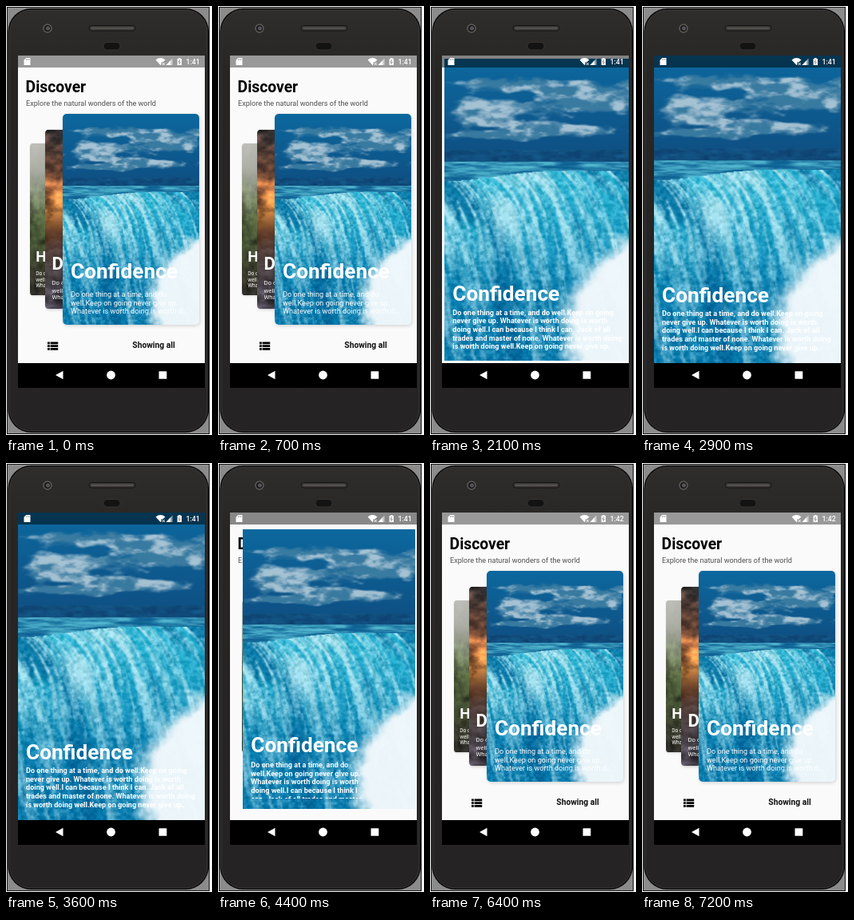
Write an HTML page with a canvas that moves like this. It is 258x537 px and loops after 7300 ms.

```html
<!DOCTYPE html>
<html lang="en">
<head>
<meta charset="utf-8">
<title>Discover</title>
<style>
@property --open { syntax: '<number>'; inherits: true; initial-value: 0; }
@property --drag { syntax: '<number>'; inherits: true; initial-value: 0; }

html, body { margin: 0; width: 100%; height: 100%; overflow: hidden; background: #fff; }
.stage { position: absolute; left: 0; top: 0; width: 258px; height: 537px; overflow: hidden; }
.stage > svg { position: absolute; left: 0; top: 0; }

.screen {
  position: absolute; left: 15px; top: 62px; width: 234px; height: 416px;
  overflow: hidden; background: #fafafa; color: #000;
  font-family: Roboto, sans-serif;
  animation: open 7300ms infinite, drag 7300ms infinite;
}
.screen > *, .card > * { position: absolute; }
.label { white-space: pre; line-height: 1.172; }
.heading { left: 9.6px; top: 29px; font-size: 19.3px; font-weight: 700; }
.intro { left: 10px; top: 54.8px; font-size: 9.12px; color: #505050; }
.filter { left: 143.3px; top: 357.3px; font-size: 10.3px; font-weight: 700; color: #111; }

.card {
  left: calc(56px + 170px * var(--drag) - 56px * var(--open));
  top: calc(73px - 73px * var(--open));
  width: calc(171px + 63px * var(--open));
  height: calc(264px + 121px * var(--open));
  overflow: hidden; border-radius: 5px; color: #fff;
  box-shadow: 1px 1.5px 4px rgba(0, 0, 0, .16);
  transform-origin: left center;
}
.front { animation: flatten 7300ms step-end infinite; }
.side { --open: 0; }
.second { left: calc(34px + 22px * var(--drag)); transform: scale(calc(.85 + .15 * var(--drag))); }
.third { left: calc(15px + 19px * var(--drag)); transform: scale(calc(.72 + .13 * var(--drag))); }
.card canvas { left: 0; top: 0; width: 100%; height: 100%; object-fit: cover; }
.title {
  left: 10px; top: calc(181.7px + 103px * var(--open));
  font-size: 26.2px; font-weight: 700; line-height: 30.7px; white-space: pre;
}
.text {
  left: 10px; top: calc(221px + 97px * var(--open)); height: calc(32px + 21.4px * var(--open));
  overflow: hidden; white-space: pre; font-size: 9.12px; line-height: 10.67px;
}
.calm { animation: calm 7300ms step-end infinite; }
.wide, .tight { font-weight: 700; opacity: 0; animation: wide 7300ms step-end infinite; }
.tight { animation-name: tight; }

.shade { left: 0; top: 0; width: 234px; height: 15px; background: rgba(0, 0, 0, calc(.39 + .1 * var(--open))); }
.nav { left: 0; top: 385px; width: 234px; height: 31px; background: #000; }
.icons { left: 0; top: 0; }
.clock { left: 210.5px; top: 2.7px; font-size: 8.8px; font-weight: 500; color: #fff; }
.before { animation: before 7300ms step-end infinite; }
.after { opacity: 0; animation: after 7300ms step-end infinite; }
.ripple { opacity: 0; animation: ripple 7300ms infinite; }

@keyframes open {
  0%, 24.52% { --open: 0; animation-timing-function: cubic-bezier(.4, 0, .2, 1); }
  30.55%, 58.75% { --open: 1; animation-timing-function: cubic-bezier(.4, 0, .2, 1); }
  64.4%, 100% { --open: 0; }
}
@keyframes drag {
  0%, 70.5% { --drag: 0; animation-timing-function: ease-out; }
  73.9%, 75.3% { --drag: .1; animation-timing-function: ease-out; }
  79.5%, 100% { --drag: 0; }
}
@keyframes flatten {
  20.55% { border-radius: 0; box-shadow: none; }
  64.4% { border-radius: 5px; box-shadow: 1px 1.5px 4px rgba(0, 0, 0, .16); }
}
@keyframes calm { 0% { opacity: 1; } 20.55% { opacity: 0; } 64.4%, 100% { opacity: 1; } }
@keyframes wide { 0% { opacity: 0; } 20.55% { opacity: 1; } 58.75%, 100% { opacity: 0; } }
@keyframes tight { 0% { opacity: 0; } 58.75% { opacity: 1; } 64.4%, 100% { opacity: 0; } }
@keyframes before { 0% { opacity: 1; } 84.93%, 100% { opacity: 0; } }
@keyframes after { 0% { opacity: 0; } 84.93%, 100% { opacity: 1; } }
@keyframes ripple { 0%, 53.3% { opacity: 0; } 54.5%, 56% { opacity: .2; } 58.9%, 100% { opacity: 0; } }
</style>
</head>
<body>
<div class="stage">
  <svg width="258" height="537">
    <defs>
      <linearGradient id="body" x2="0" y2="1">
        <stop offset="0" stop-color="#2f2d2c"/>
        <stop offset=".15" stop-color="#282625"/>
        <stop offset="1" stop-color="#252323"/>
      </linearGradient>
    </defs>
    <rect x="1.5" y="1.5" width="253" height="534" fill="#8b8b8b" stroke="#111"/>
    <rect x="2.5" y="3" width="251.5" height="531" rx="29" fill="#0c0b0b"/>
    <rect x="4.5" y="5" width="247.5" height="527" rx="27" fill="url(#body)" stroke="#454241" stroke-width=".8"/>
    <circle cx="52" cy="28" r="5" fill="#1b1a1a" stroke="#5f5c5a" stroke-width="1.5"/>
    <circle cx="52.5" cy="28" r="2" fill="#4a4b50" stroke="#77757a" stroke-width=".8"/>
    <rect x="104" y="24.5" width="58" height="6.5" rx="3.2" fill="#3d3a38" stroke="#121111"/>
    <path d="M107 27.7h52" stroke="#5d5a58" stroke-width="1.6"/>
    <rect x="122" y="45.5" width="21" height="9.5" rx="4.7" fill="#141313" stroke="#3b3836" stroke-width=".8"/>
  </svg>

  <div class="screen">
    <div class="label heading">Discover</div>
    <div class="label intro">Explore the natural wonders of the world</div>
    <div class="label filter">Showing all</div>
    <svg style="left:37px;top:358px" width="14" height="12">
      <path d="M0 1.8h2.8M3.6 1.8h9.6M0 5.6h2.8M3.6 5.6h9.6M0 9.4h2.8M3.6 9.4h9.6" stroke="#000" stroke-width="2.8"/>
    </svg>

    <div class="card side third">
      <canvas id="forest"></canvas>
      <div class="title">Happiness</div>
      <div class="text">Do one thing at a time, and do
well.Keep on going never give up.
Whatever is worth doing is worth d…</div>
    </div>
    <div class="card side second">
      <canvas id="sunset"></canvas>
      <div class="title">Dreams</div>
      <div class="text">Do one thing at a time, and do
well.Keep on going never give up.
Whatever is worth doing is worth d…</div>
    </div>
    <div class="card front">
      <canvas id="waterfall"></canvas>
      <div class="title">Confidence</div>
      <div class="text calm">Do one thing at a time, and do
well.Keep on going never give up.
Whatever is worth doing is worth d…</div>
      <div class="text wide">Do one thing at a time, and do well.Keep on going
never give up. Whatever is worth doing is worth
doing well.I can because I think I can. Jack of all
trades and master of none. Whatever is worth doing
is worth doing well.Keep on going never give up.</div>
      <div class="text tight">Do one thing at a time, and do
well.Keep on going never give up.
Whatever is worth doing is worth
doing well.I can because I think I
can. Jack of all trades and master</div>
    </div>

    <div class="shade"></div>
    <div class="nav"></div>
    <svg class="icons" width="234" height="416" viewBox="15 62 234 416" fill="#fff">
      <path d="M25.2 65H30.5V74H22.5V67.7Z"/>
      <path d="M25.6 66v2M27.3 66v2M29 66v2" stroke="#888" stroke-width=".7"/>
      <path d="M187.5 67.5Q193.5 62.7 199.5 67.5L196.5 70.2H194.5V73.2L193.5 74Z"/>
      <path d="M195.8 71l3 3m0-3l-3 3" stroke="#fff"/>
      <path d="M208.5 65.5V74H200.5Z" opacity=".55"/>
      <path d="M206 68.2V74H200.5Z"/>
      <path d="M216 65h2.6v1h1.4v8h-5.4v-8h1.4Z"/>
      <path d="M217.9 67.2l-1.9 3h2.4l-1.7 2.8" fill="none" stroke="#777" stroke-width=".8"/>
      <ellipse class="ripple" cx="66" cy="462" rx="23" ry="15.5"/>
      <path d="M62 462L71.500 456.700V467.300Z"/>
      <circle cx="131.500" cy="462" r="5.400"/>
      <rect x="191.500" y="457.200" width="9.800" height="9.600" rx=".6"/>
    </svg>
    <div class="label clock before">1:41</div>
    <div class="label clock after">1:42</div>
  </div>
</div>

<script>
const mix = (a, b, t) => a.map((c, i) => c + (b[i] - c) * t);
const clamp = t => Math.min(1, Math.max(0, t));
const smooth = (lo, hi, x) => {
  const t = clamp((x - lo) / (hi - lo));
  return t * t * (3 - 2 * t);
};
const hash = (x, y) => {
  const s = Math.sin(x * 127.1 + y * 311.7) * 43758.5453;
  return s - Math.floor(s);
};
function noise(x, y) {
  const i = Math.floor(x), j = Math.floor(y);
  const a = smooth(0, 1, x - i), b = smooth(0, 1, y - j);
  const top = hash(i, j) * (1 - a) + hash(i + 1, j) * a;
  const low = hash(i, j + 1) * (1 - a) + hash(i + 1, j + 1) * a;
  return top * (1 - b) + low * b;
}
function fbm(x, y) {
  let sum = 0;
  for (let k = 0, gain = .533; k < 4; k++, gain /= 2) sum += gain * noise(x * 2 ** k + k * 9, y * 2 ** k);
  return sum;
}
function ramp(stops, t) {
  const at = clamp(t) * (stops.length - 1);
  const i = Math.min(stops.length - 2, Math.floor(at));
  return mix(stops[i], stops[i + 1], at - i);
}
const distance = (u, v, [x, y, rx, ry]) => Math.hypot((u - x) / rx, (v - y) / ry);

// Cloud banks and spray: centre x, centre y, radius x, radius y
const banks = [[.85, .13, .3, .05], [.25, .185, .34, .042], [.4, .085, .24, .028],
               [.72, .235, .4, .022], [.18, .25, .34, .016]];
const spray = [1.1, .88, .47, .3];

function sky(u, v) {
  const n = fbm(u * 7, v * 26 + 4) - .5;
  const near = Math.min(...banks.map(bank => distance(u, v, bank)));
  const cover = smooth(1.15, .6, near - n * 2.2);
  const light = smooth(.35, .66, fbm(u * 12 + 3, v * 40 + 7));
  const air = mix([12, 104, 158], [14, 80, 132], v / .31);
  return mix(air, mix([62, 126, 162], [186, 208, 220], light), cover * .88);
}

function water(u, v, lip) {
  const drop = v - lip;
  const source = u - .12 * (1 - Math.exp(-drop * 13)) - .27 * drop;
  const clump = fbm(source * 9, drop * 2.5);
  const strand = fbm(source * 38, drop * 8);
  const grain = fbm(u * 60, v * 95);
  const deep = smooth(0, .5, drop);
  const base = mix([36, 176, 208], [6, 122, 172], deep);
  const shaded = mix(base, [4, 100, 152], smooth(.52, .32, clump) * .65);
  const foam = smooth(.42, .72, strand * .5 + clump * .35 + grain * .15 + .04 * (1 - deep));
  const fall = mix(shaded, [196, 236, 244], foam * (.85 - .35 * deep)).map(c => c + (grain - .5) * 60);
  const far = distance(u, v, spray) + .45 * (fbm(u * 7, v * 11) - .5);
  return mix(fall, [242, 249, 252], .97 * smooth(1.12, .82, far));
}

function waterfall(u, v) {
  const lip = .405 - .035 * smooth(0, .6, u);
  if (v < .3) return sky(u, v);
  if (v < .34) return mix([10, 58, 104], [24, 98, 148], fbm(u * 24, v * 90));
  if (v < lip) return mix([14, 98, 148], [84, 184, 208], smooth(.25, .8, fbm(u * 9, v * 140)));
  return water(u, v, lip);
}

const dusk = [[62, 56, 56], [96, 70, 60], [116, 76, 58], [172, 104, 62], [222, 144, 72], [110, 68, 46],
              [76, 56, 50], [72, 62, 62], [66, 60, 68], [84, 78, 90]];
const sunset = (u, v) => {
  const n = fbm(u * 9, v * 20) - .5;
  return ramp(dusk, v + n * .24).map(c => c * (1 + n * 1.5));
};

const woods = [[190, 190, 184], [172, 174, 164], [132, 142, 116], [88, 104, 66],
               [66, 80, 50], [58, 60, 44], [46, 45, 40]];
const forest = (u, v) => {
  const n = fbm(u * 18, v * 20) - .5;
  return ramp(woods, v + n * .12).map(c => c * (1 + n * 1.3 * smooth(.1, .5, v)));
};

function paint(id, shader) {
  const canvas = document.getElementById(id);
  const w = canvas.width = 234, h = canvas.height = 361;
  const ctx = canvas.getContext('2d');
  const image = ctx.createImageData(w, h);
  for (let y = 0; y < h; y++) {
    for (let x = 0; x < w; x++) image.data.set([...shader(x / w, y / h), 255], (y * w + x) * 4);
  }
  ctx.putImageData(image, 0, 0);
}
paint('forest', forest);
paint('sunset', sunset);
paint('waterfall', waterfall);
</script>
</body>
</html>
```
